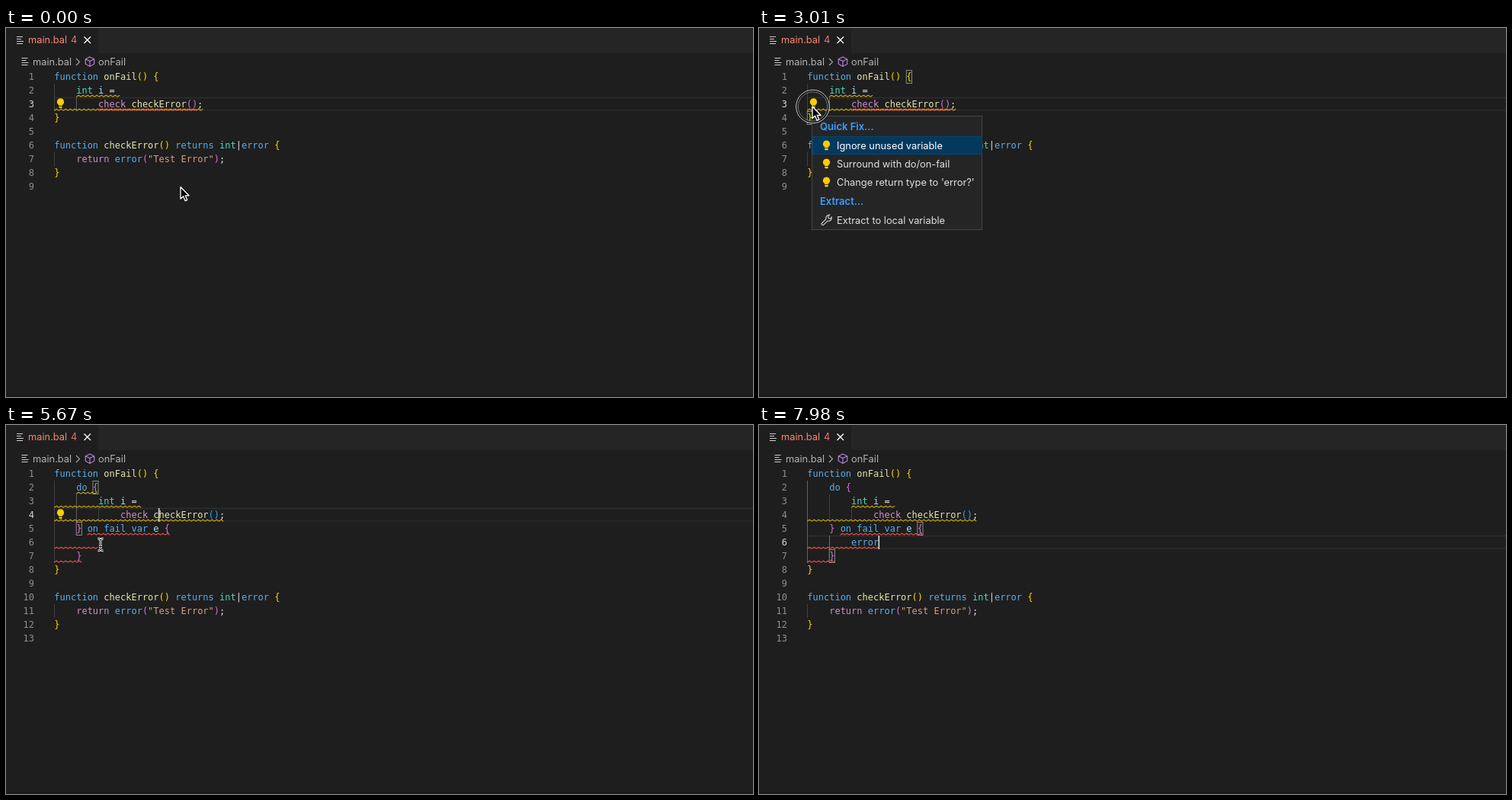
These frames come from a looping animation (980x484 px, 8 s). An HTML page:

```html
<!DOCTYPE html>
<html lang="en">
<head>
<meta charset="utf-8">
<title>Quick fix in an editor</title>
<style>
html, body { margin: 0; width: 100%; height: 100%; overflow: hidden; background: #1e1e1e; }
svg { display: block; width: 980px; height: 484px; }
.mono { font: 12px "DejaVu Sans Mono", monospace; }
.ui { font: 12.85px Inter, sans-serif; }
.head { font: 600 13px Inter, sans-serif; }
.keys { font: 12px Inter, "DejaVu Sans", sans-serif; }
</style>
</head>
<body>
<svg id="stage" viewBox="0 0 980 484"></svg>
<script>
const LOOP = 8000, STEP = 70, CHAR = 7.224, LEFT = 63.3, ROW = 18, TOP = 55;
const WARN = '#d2aa00', ERR = '#f14c4c', LINK = '#3d9dff', BULB = '#ffcc00', PLAIN = '#e0e0e0', DIM = '#8e8e8e';
const stage = document.getElementById('stage');

const colX = c => LEFT + c * CHAR;
const rowY = n => TOP + (n - 1) * ROW;
const within = (t, a, b) => t >= a && t < b;
const esc = s => s.replace(/&/g, '&amp;').replace(/</g, '&lt;');
const rect = (x, y, w, h, fill, extra = '') =>
  `<rect x="${x}" y="${y}" width="${w}" height="${h}" fill="${fill}" ${extra}/>`;
const line = (d, color, width = 1, extra = '') =>
  `<path d="${d}" fill="none" stroke="${color}" stroke-width="${width}" ${extra}/>`;
const text = (x, y, s, fill, cls = 'mono', extra = '') =>
  `<text x="${x}" y="${y}" class="${cls}" fill="${fill}" ${extra}>${esc(s)}</text>`;

const checkFn = [
  '', 'function checkError() returns int|error {',
  '    return error("Test Error");', '}', ''
];
const before = ['function onFail() {', '    int i =', '        check checkError();', '}', ...checkFn];
const after = typed => [
  'function onFail() {', '    do {', '        int i =', '            check checkError();',
  '    } on fail var e {', '        ' + typed, '    }', '}', ...checkFn
];

const PAIRS = ['#ffd700', '#da70d6', '#2ba3ff'];
const KINDS = [
  [/^(function|returns|error|do|on|fail|var)$/, '#5aaeea'],
  [/^(return|check)$/, '#d08fcb'],
  [/^int$/, '#4fd8be'],
  [/^(onFail|checkError)$/, '#e5e5b0'],
  [/^\w+$/, '#9fe2ff'],
  [/^"/, '#db9a7e']
];

function code(lines, active) {
  let out = '', depth = 0;
  lines.forEach((src, i) => {
    const y = rowY(i + 1) + 13;
    out += text(37, y, String(i + 1), i + 1 === active ? '#d4d4d4' : DIM, 'mono', 'text-anchor="end"');
    for (const m of src.matchAll(/"[^"]*"|\w+|\S/g)) {
      const s = m[0];
      let color;
      if ('({'.includes(s)) color = PAIRS[depth++ % 3];
      else if (')}'.includes(s)) color = PAIRS[--depth % 3];
      else color = (KINDS.find(k => k[0].test(s)) || [0, PLAIN])[1];
      out += text(colX(m.index).toFixed(2), y, s, color);
    }
  });
  return out;
}

function squiggle(row, from, to, color) {
  const y = rowY(row) + 15.2, end = colX(to);
  let d = '', up = 0;
  for (let x = colX(from); x <= end; x += 3, up ^= 1) d += `${d ? 'L' : 'M'}${x.toFixed(1)} ${y + (up ? 0 : 2)}`;
  return line(d, color, 1.1);
}

const guide = (col, from, to, color = '#404040') =>
  line(`M${Math.floor(colX(col)) + .5} ${rowY(from)}V${rowY(to + 1)}`, color);
const bracket = (row, col) =>
  rect(colX(col).toFixed(1), rowY(row) + .5, 7.2, 17, 'rgba(0,100,0,.1)', 'stroke="#888"');
const caret = (row, col) => rect(colX(col) - .7, rowY(row), 1.6, ROW, '#d8d8d8');
const currentLine = row =>
  line(`M63 ${rowY(row) + .5}H980M63 ${rowY(row) + 16.8}H980`, '#2d2d2d', 1.3);

const bulb = (x, y) => `<g transform="translate(${x} ${y}) scale(.92)" fill="${BULB}">
  <path d="M0-7a5 5 0 0 1 3 9q-.6.6-.6 1.2h-4.8q0-.6-.6-1.2a5 5 0 0 1 3-9z"/><path d="M-2.4 4.2h4.8v1.4l-1 1.2h-2.8l-1-1.2z"/></g>`;

const fileIcon = (x, y) =>
  line(`M${x} ${y}h8M${x} ${y + 3}h6M${x} ${y + 6}h9M${x} ${y + 9}h8`, '#d0d0d0', 1.2);

function chrome() {
  return rect(0, 0, 980, 484, '#1e1e1e') + rect(121, 0, 859, 33, '#252526') + rect(0, 482, 980, 2, '#191919') +
    fileIcon(14, 11.5) + text(29, 20, 'main.bal', '#fa8672', 'ui') + text(85, 20, '4', '#de7767', 'ui') +
    line('M102.5 11.5l8.5 8.5M111 11.5l-8.5 8.5', '#fff', 1.3) +
    fileIcon(20.5, 39.5) + text(35, 49, 'main.bal', '#b2b2b2', 'ui') +
    line('M92 40l4.5 4.5-4.5 4.5', '#a9a9a9', 1.1) +
    line('M110 38l5.7 2.8v6.4l-5.7 3.2-5.7-3.2v-6.4zM104.3 40.8l5.7 2.8 5.7-2.8M110 43.6v6.8', '#b180d7', 1.2) +
    text(121, 49, 'onFail', '#b2b2b2', 'ui');
}

// Each message is a list of lines; its last line is followed by a diagnostic id.
function hover(y, width, messages, id) {
  const height = messages.reduce((h, m) => h + 9 + m.length * ROW, 24);
  let out = rect(63.5, y + .5, width, height - 1, '#252526', 'stroke="#454545"'), top = y;
  for (const m of messages) {
    m.forEach((s, i) => {
      const base = top + 18 + i * ROW;
      out += text(72, base, s, '#d8d8d8');
      if (i === m.length - 1) out += text(72 + (s.length + 1) * CHAR, base, id(s), DIM);
    });
    top += 9 + m.length * ROW;
    out += line(`M64 ${top + .5}H${63 + width}`, '#454545');
  }
  return out + rect(64, top + 1, width - 1, 22, '#2c2c2d') +
    text(72, top + 17, 'View Problem (⌥F8)', LINK, 'keys') +
    text(204, top + 17, 'Quick Fix... (⌘.)', LINK, 'keys');
}

const unused = ["unused variable 'i'"];
const misuse = ["invalid usage of the 'check' expression operator: no matching error return type(s) in the enclosing", 'invokable'];
const failUse = ["invalid usage of 'on fail' clause: unreachable block"];

function menu(picked) {
  const items = ['Ignore unused variable', 'Surround with do/on-fail', "Change return type to 'error?'"];
  let out = rect(69.5, 115.5, 223, 149, '#252526', 'stroke="#454545"') +
    rect(70.5, 142.5 + picked * 24, 222, 23, '#04395e', 'stroke="#08456f"') +
    text(80, 134, 'Quick Fix...', LINK, 'head') + text(80, 232, 'Extract...', LINK, 'head');
  items.forEach((s, i) => {
    out += bulb(88.5, 154 + i * 24) + text(102, 159 + i * 24, s, i === picked ? '#fff' : PLAIN, 'ui');
  });
  return out + text(102, 257, 'Extract to local variable', PLAIN, 'ui') +
    line('M82 256.5l6-6q-1-4 3-5.3l1.6-.1-2 2.4.7 2 2 .6 2-2q.3 4-3.2 5-1 .2-2 0l-6 5.6q-2.5-.4-2.1-2.2z', '#d0d0d0', 1.1);
}

function suggest() {
  const rows = [['error', 'type'], ['error', 'keyword'], ['checkError()', 'int|error'], ['onFail()', '()']];
  let out = rect(121.5, 163.5, 430, 76, '#252526', 'stroke="#454545"') +
    rect(551.5, 163.5, 292, 76, '#252526', 'stroke="#454545"') + rect(122, 165, 429, 18, '#04395e');
  rows.forEach(([name, kind], i) => {
    const y = 178 + i * ROW;
    out += rect(127, y - 8, 8, 8, 'none', 'stroke="#75beff"') + text(142, y, name, PLAIN) +
      text(544, y, kind, DIM, 'mono', 'text-anchor="end"');
  });
  return out + text(560, 178, 'error', PLAIN);
}

const PATH = [
  [70, 190, 161], [210, 190, 161], [490, 172, 107], [980, 172, 107], [1120, 178, 104.5],
  [2310, 178, 104.5], [2800, 70, 103], [3430, 70, 103], [4200, 115, 177],
  [5110, 115, 177], [5670, 124, 157], [6370, 124, 157], [6720, 162, 231]
];
function pointerAt(t) {
  if (t < 70) return [229, 208.5];
  const i = PATH.findIndex(p => p[0] > t);
  if (i < 0) return PATH[PATH.length - 1].slice(1);
  const a = PATH[i - 1], b = PATH[i];
  const u = (t - a[0]) / (b[0] - a[0]), k = u * u * (3 - 2 * u);
  return [1, 2].map(n => a[n] + (b[n] - a[n]) * k);
}

const ARROW = 'M0 0V15.6L3.6 12.3 6.1 18.2 8.7 17.1 6.2 11.3H11z';
const HAND = 'M-2.5-1.2a1.5 1.5 0 0 1 3 0v4l5 1q1.6.4 1.3 2l-1 4.7q-.3 1.5-1.6 1.5h-4.7q-1 0-1.6-1l-3.5-4.5q-.6-1.7 1-1.5l2.1 1.2z';
const BEAM = 'M-3.5-8q3 0 3.5 2 .5-2 3.5-2M0-6V6M-3.5 8q3 0 3.5-2 .5 2 3.5 2M-2 2.5H2';

function pointer(t) {
  const [x, y] = pointerAt(t), menuOpen = within(t, 3010, 4620);
  let art;
  if (menuOpen && y > 142)
    art = `<path d="${HAND}" fill="#fff" stroke="#111" stroke-width=".9"/>` + line('M1.8 5v3.5M4 5.5v3', '#111', .8);
  else if (t < 70 || menuOpen || (x < 90 && t < 4000))
    art = `<path d="${ARROW}" fill="#000" stroke="#fff" stroke-width="1.3" stroke-linejoin="round"/>`;
  else art = line(BEAM, '#fff', 2.8) + line(BEAM, '#111', 1);
  return `<g transform="translate(${x.toFixed(1)} ${y.toFixed(1)})">${art}</g>`;
}

// start, end, centre, first radius, growth per step
const CLICKS = [
  [630, 770, 172, 106, 12, 8], [2940, 3080, 70.5, 103, 14, 7.8],
  [4480, 4620, 113.5, 174, 31, 0], [6160, 6300, 124, 157, 22, 8]
];
function rings(t) {
  return CLICKS.filter(c => within(t, c[0], c[1])).map(([a, , x, y, r0, grow]) => {
    const r = r0 + grow * (t - a) / STEP;
    const ring = (rad, color, w) => `<circle cx="${x}" cy="${y}" r="${rad}" fill="none" stroke="${color}" stroke-width="${w}"/>`;
    return ring(r - 1.3, '#161616', 1.8) + ring(r, '#c4c4c4', 1) + ring(r - 2.6, '#8c8c8c', .8);
  }).join('');
}

function firstView(t) {
  const menuOpen = within(t, 3010, 4620), hot = within(t, 1540, 2940);
  let out = currentLine(3);
  if (hot) out += rect(colX(8), 91, 18 * CHAR, 18, 'rgba(38,79,120,.3)');
  out += guide(0, 2, 3) + guide(4, 3, 3, '#606060') + guide(0, 7, 7);
  if (t >= 630) out += bracket(1, 18) + bracket(4, 0);
  out += code(before, 3) + squiggle(2, 4, 12, WARN) + squiggle(3, 0, 27, WARN) + squiggle(3, 8, 26, ERR) + bulb(71.5, 98.8);
  if (within(t, 630, 1190) || within(t, 1750, 2240) || within(t, 2740, 2940)) out += caret(3, 15);
  if (hot) out += hover(109, 807, [unused, unused, misuse, misuse], s => s === 'invokable' ? '(BCE3032)' : '(BCE20403)');
  if (menuOpen) out += menu(pointerAt(t)[1] > 166 ? 1 : 0);
  return out;
}

function secondView(t) {
  const onBlock = t >= 6230, checked = t >= 5250, settled = t >= 6440;
  const count = [7280, 7350, 7420, 7910, 7980].filter(k => t >= k).length;
  const active = onBlock ? 6 : 4;
  let out = currentLine(active) + guide(0, 2, 7, onBlock ? '#606060' : '#404040') +
    guide(4, 3, 4, onBlock ? '#404040' : '#606060') + guide(8, 4, 4) + guide(0, 11, 11);
  if (count) out += guide(4, 6, 6, '#707070');
  out += onBlock ? bracket(5, 20) + bracket(7, 4) : bracket(2, 7) + bracket(5, 4);
  out += code(after('error'.slice(0, count)), active);
  if (!settled) out += squiggle(2, 4, 8, WARN);
  out += squiggle(3, settled ? 8 : 0, 16, WARN) + squiggle(4, 0, 31, WARN);
  if (checked) out += squiggle(5, 6, 21, ERR) + squiggle(6, 0, 8 + count, ERR) + squiggle(7, 0, 5, ERR);
  else out += squiggle(4, 12, 30, ERR);
  if (checked && !settled) out += bulb(71.5, 116.8);
  if (within(t, 4690, 5180) || within(t, 5670, 6160)) out += caret(4, 19);
  if (within(t, 6230, 6720) || t >= 7280) out += caret(6, 8 + count);
  if (within(t, 5950, 6230)) out += hover(163, 478, [failUse, failUse], () => '(BCE20417)');
  if (within(t, 7420, 7980)) out += suggest();
  return out;
}

const frame = chrome();
let shown = -1;
function draw(now) {
  const t = Math.floor((now % LOOP) / STEP) * STEP;
  if (t !== shown) {
    shown = t;
    stage.innerHTML = frame + (t < 4690 ? firstView(t) : secondView(t)) + rings(t) + (t < 7210 ? pointer(t) : '');
  }
}

let start;
function tick(now) {
  start ??= now;
  draw(Math.max(0, now - start));
  requestAnimationFrame(tick);
}
draw(0);
requestAnimationFrame(tick);
</script>
</body>
</html>
```
